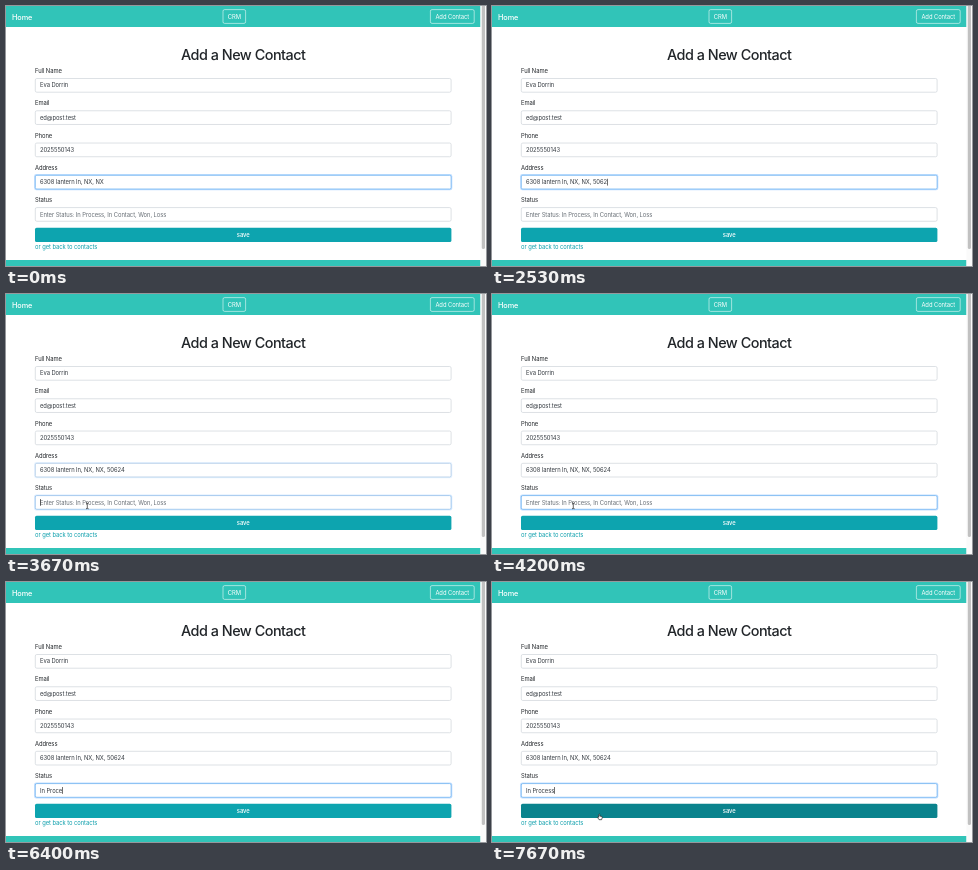
Write an HTML page with a canvas that moves like this. It is 480 px wide and 260 px high and loops after 8000 ms.

```html
<!DOCTYPE html>
<html lang="en">
<head>
<meta charset="utf-8">
<title>Add a New Contact</title>
<style>
  html, body { margin: 0; width: 100%; height: 100%; overflow: hidden; background: #fff; }
  canvas { display: block; width: 480px; height: 260px; }
</style>
</head>
<body>
<canvas id="stage"></canvas>
<script>
const W = 480, H = 260, LOOP = 8000, TICK = 200 / 3;
const canvas = document.getElementById('stage');
const ctx = canvas.getContext('2d');
const dpr = window.devicePixelRatio || 1;
canvas.width = W * dpr;
canvas.height = H * dpr;

const TEAL = '#31c4b8', INK = '#212529';
const LEFT = 29, WIDTH = 416.4, TOP = 72.2, PITCH = 32.27, BOX = 14.3;
const BODY = 5.85, TRACK = -0.07;
const ADDRESS = 3, STATUS = 4;

const labels = ['Full Name', 'Email', 'Phone', 'Address', 'Status'];
const fixed = ['Eva Dorrin', 'ed@post.test', '2025550143'];
const hint = 'Enter Status: In Process, In Contact, Won, Loss';
const street = '6308 lantern ln, NX, NX';

// [time, typed text, caret visible]
const addressKeys = [
  [0, '', 0], [70, '', 1], [270, ',', 1], [730, ', 5', 1], [870, ', 5', 0],
  [1070, ', 50', 1], [1470, ', 50', 0], [2000, ', 50', 1], [2200, ', 506', 1],
  [2530, ', 5062', 1], [2800, ', 50624', 1], [3330, ', 50624', 0]
];
const statusKeys = [
  [0, '', 0], [3600, '', 1], [4130, '', 0], [4730, 'I', 1], [4930, 'In', 1],
  [5130, 'In ', 1], [5330, 'In ', 0], [5530, 'In P', 1], [5730, 'In Pr', 1],
  [5930, 'In Pro', 1], [6200, 'In Proc', 1], [6400, 'In Proce', 1],
  [6670, 'In Proces', 1], [6800, 'In Process', 1], [7000, 'In Process', 0],
  [7530, 'In Process', 1]
];

const clamp = v => Math.max(0, Math.min(1, v));
const ramp = (t, a, b) => clamp((t - a) / (b - a));
const ease = p => p * p * (3 - 2 * p);
const mix = (a, b, p) => a + (b - a) * p;
const blend = (a, b, p) => `rgb(${a.map((v, i) => Math.round(mix(v, b[i], p)))})`;
const keyAt = (keys, t) => keys.filter(k => t >= k[0]).pop();

// Type is laid out at 4x and scaled down so that advances stay fractional.
function setFont(size, weight, track) {
  ctx.font = `${weight} ${size * 4}px Inter, "Open Sans", sans-serif`;
  ctx.letterSpacing = `${track * 4}px`;
}

function text(str, x, mid, color, { size = BODY, weight = 400, track = TRACK, align = 'left' } = {}) {
  ctx.save();
  setFont(size, weight, track);
  const w = ctx.measureText(str).width / 4;
  ctx.translate(align === 'center' ? x - w / 2 : x, mid + size * 0.363);
  ctx.scale(0.25, 0.25);
  ctx.fillStyle = color;
  ctx.fillText(str, 0, 0);
  ctx.restore();
  return w;
}

function rounded(x, y, w, h, r) {
  ctx.beginPath();
  ctx.roundRect(x, y, w, h, r);
}

function rect(x, y, w, h, color) {
  ctx.fillStyle = color;
  ctx.fillRect(x, y, w, h);
}

function navButton(str, x, w) {
  rounded(x, 3.6, w, 13.8, 1.6);
  ctx.strokeStyle = 'rgba(255,255,255,.9)';
  ctx.lineWidth = 0.6;
  ctx.stroke();
  text(str, x + w / 2, 10.7, '#fff', { align: 'center' });
}

function field(i, value, focus, caret) {
  const y = TOP + i * PITCH, mid = y + BOX / 2;
  text(labels[i], LEFT, mid - 14.4, INK);
  if (focus > 0) {
    rounded(LEFT - 0.9, y - 0.9, WIDTH + 1.8, BOX + 1.8, 2.2);
    ctx.fillStyle = `rgba(0,123,255,${0.25 * focus})`;
    ctx.fill();
  }
  rounded(LEFT + 0.3, y + 0.3, WIDTH - 0.6, BOX - 0.6, 1.5);
  ctx.fillStyle = '#fff';
  ctx.fill();
  ctx.strokeStyle = blend([206, 212, 218], [100, 172, 240], focus);
  ctx.lineWidth = 0.7;
  ctx.stroke();

  const x = LEFT + 5;
  const w = value ? text(value, x, mid, '#343a40') : 0;
  if (!value) text(hint, x, mid, '#666d74');
  if (caret) rect(x + w + 0.1, mid - 3.4, 0.65, 6.8, '#222');
}

function beam(x, y) {
  ctx.beginPath();
  ctx.moveTo(x - 1.3, y - 3);
  ctx.quadraticCurveTo(x, y - 3, x, y - 2);
  ctx.lineTo(x, y + 2);
  ctx.quadraticCurveTo(x, y + 3, x - 1.3, y + 3);
  ctx.moveTo(x + 1.3, y - 3);
  ctx.quadraticCurveTo(x, y - 3, x, y - 2);
  ctx.moveTo(x, y + 2);
  ctx.quadraticCurveTo(x, y + 3, x + 1.3, y + 3);
  ctx.strokeStyle = '#222';
  ctx.lineWidth = 0.7;
  ctx.stroke();
}

function hand(x, y) {
  ctx.save();
  ctx.translate(x, y);
  ctx.beginPath();
  ctx.moveTo(-1.2, 0.5);
  ctx.lineTo(-1.2, -2.4);
  ctx.quadraticCurveTo(-0.7, -3.2, -0.2, -2.4);
  ctx.lineTo(-0.2, -0.7);
  ctx.lineTo(1.8, -0.3);
  ctx.quadraticCurveTo(2.4, 0, 2.2, 1);
  ctx.lineTo(1.6, 2.9);
  ctx.lineTo(-0.9, 2.9);
  ctx.lineTo(-2.5, 0.6);
  ctx.quadraticCurveTo(-2.2, -0.3, -1.2, 0.5);
  ctx.closePath();
  ctx.fillStyle = '#fff';
  ctx.strokeStyle = '#222';
  ctx.lineWidth = 0.7;
  ctx.fill();
  ctx.stroke();
  ctx.restore();
}

function pointer(t) {
  if (t >= 3130 && t < 4730) {
    const p = ease(ramp(t, 3130, 3330));
    beam(mix(75, 81.3, p), mix(206, 211.8, p));
  } else if (t >= 7270) {
    const p = ease(ramp(t, 7270, 7400)), q = ramp(t, 7400, 7670);
    hand(mix(102, 106.7, p) + q * 1.3, mix(238.5, 234, p) + q * 0.8);
  }
}

function draw(t) {
  ctx.setTransform(dpr, 0, 0, dpr, 0, 0);
  rect(0, 0, W, H, '#fff');
  rect(0, 0, 474.5, 21, TEAL);
  rect(0, 254, 474.5, 6, TEAL);
  rect(474.5, 0, 5.5, H, '#fafafa');
  rounded(475.8, -3, 3.2, 246, 1.6);
  ctx.fillStyle = '#c1c1c1';
  ctx.fill();

  text('Home', 6, 10.9, '#fff', { size: 7.3, weight: 500, track: -0.1 });
  navButton('CRM', 217, 22.6);
  navButton('Add Contact', 424.4, 43.8);
  text('Add a New Contact', 237.2, 48.9, INK,
    { size: 14.4, weight: 500, track: -0.5, align: 'center' });

  const shift = ease(ramp(t, 3550, 3760));
  const [, tail, addressCaret] = keyAt(addressKeys, t);
  const [, status, statusCaret] = keyAt(statusKeys, t);
  fixed.forEach((value, i) => field(i, value, 0, 0));
  field(ADDRESS, street + tail, 1 - shift, addressCaret);
  field(STATUS, status, shift, statusCaret);

  rounded(LEFT, 221.8, WIDTH, 14.2, 1.6);
  ctx.fillStyle = blend([13, 164, 175], [10, 131, 141], ease(ramp(t, 7330, 7600)));
  ctx.fill();
  text('save', 237.2, 229, '#fff', { weight: 500, align: 'center' });
  text('or get back to contacts', LEFT, 240.6, '#0d9fac');
  pointer(t);
}

function frame(now) {
  const t = now % LOOP;
  draw(Math.floor((t + 5) / TICK) * TICK + 5);
  requestAnimationFrame(frame);
}
requestAnimationFrame(frame);
</script>
</body>
</html>
```
